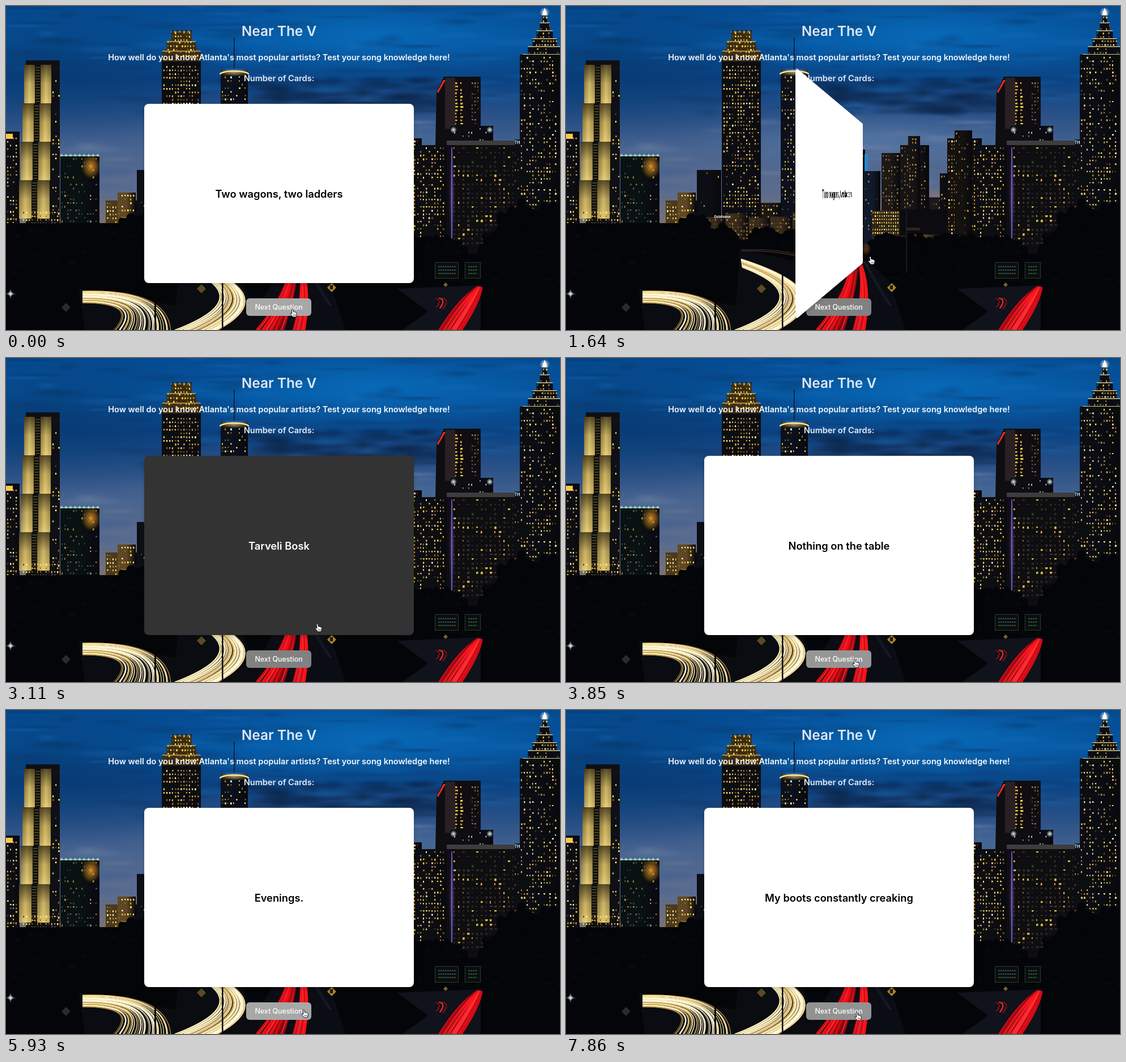
An HTML page with a canvas that plays this animation: 978x573 px, repeating every 8000 ms.

```html
<!DOCTYPE html>
<html lang="en">
<head>
<meta charset="utf-8">
<title>Song cards</title>
<style>
  html, body { margin: 0; width: 100%; height: 100%; overflow: hidden; background: #04060b; }
  #stage { position: relative; width: 978px; height: 573px; overflow: hidden; font-family: Inter, "Open Sans", sans-serif; color: #fff; }
  #stage > * { position: absolute; }
  #city { left: 0; top: 0; }
  .line { left: 0; width: 964px; text-align: center; font-weight: 600; font-size: 14.55px; line-height: 30px; white-space: nowrap; }
  #title { top: 29px; font-size: 24.4px; opacity: .86; }
  #intro { top: 76px; opacity: .96; }
  #count { top: 113px; opacity: .9; }
  #next { left: 424px; top: 517px; width: 115px; height: 31px; border-radius: 6px; font-size: 12.4px; font-weight: 500; line-height: 32px; text-align: center; }
  #scene { left: 244px; top: 173px; width: 476px; height: 317px; perspective: 800px; }
  #card { position: absolute; inset: 0; transform-style: preserve-3d; }
  .face { position: absolute; inset: 0; border-radius: 8px; display: flex; align-items: center; justify-content: center; font-size: 18.3px; font-weight: 600; backface-visibility: hidden; box-shadow: 0 3px 7px rgba(0, 0, 0, .2); }
  #front { background: #fff; color: #000; }
  #back { background: #333; transform: rotateY(180deg); }
  #hand { left: -7px; top: -8px; width: 14px; height: 16px; }
</style>
</head>
<body>
<div id="stage">
  <canvas id="city" width="978" height="573"></canvas>
  <div class="line" id="title">Near The V</div>
  <div class="line" id="intro">How well do you know Atlanta's most popular artists? Test your song knowledge here!</div>
  <div class="line" id="count">Number of Cards:</div>
  <div id="next">Next Question</div>
  <div id="scene"><div id="card">
    <div class="face" id="front"></div>
    <div class="face" id="back"></div>
  </div></div>
  <svg id="hand" viewBox="0 0 14 16">
    <path d="M3.2 2.2Q3.4.8 4.6 1Q5.6 1.1 5.8 2.3L6.3 6Q7.6 5.2 8.3 6.3Q9.6 5.7 10.3 6.9Q12 6.6 12.3 8.2L12.4 11L11 15H5.2L3.4 12.3L1 9.6Q.6 8.2 2 8.1L4 9.2Z" fill="#fff" stroke="#000" stroke-width=".9"/>
    <path d="M6.4 10.2v3M8.2 10.2v3M10 10.2v3" stroke="#222" stroke-width=".7"/>
  </svg>
</div>
<script>
const start = performance.now();
const $ = id => document.getElementById(id);
const c = $('city').getContext('2d');

let seed = 7;
function rnd(a = 0, b = 1) {
  seed = (seed + 0x6D2B79F5) | 0;
  let n = Math.imul(seed ^ seed >>> 15, 1 | seed);
  n = n + Math.imul(n ^ n >>> 7, 61 | n) ^ n;
  return a + (b - a) * ((n ^ n >>> 14) >>> 0) / 4294967296;
}
const pick = list => list[Math.floor(rnd() * list.length)];
const times = (n, draw) => { for (let i = 0; i < n; i++) draw(i); };

function rect(fill, x, y, w, h) {
  c.fillStyle = fill;
  c.fillRect(x, y, w, h);
}
function poly(fill, ...p) {
  c.fillStyle = fill;
  c.beginPath();
  for (let i = 0; i < p.length; i += 2) c.lineTo(p[i], p[i + 1]);
  c.fill();
}
function blend(g, colors) {
  colors.forEach((col, i) => g.addColorStop(i / (colors.length - 1), col));
  return g;
}
const down = (y0, y1, ...colors) => blend(c.createLinearGradient(0, y0, 0, y1), colors);
const across = (x0, x1, ...colors) => blend(c.createLinearGradient(x0, 0, x1, 0), colors);
function glow(color, x, y, rx, ry, alpha) {
  c.save();
  c.translate(x, y);
  c.scale(rx, ry);
  c.globalAlpha = alpha;
  c.fillStyle = blend(c.createRadialGradient(0, 0, 0, 0, 0, 1), [color, color + '00']);
  c.fillRect(-1, -1, 2, 2);
  c.restore();
}
function label(text, x, y, size, color) {
  c.font = `700 ${size}px Inter, sans-serif`;
  c.textAlign = 'center';
  c.fillStyle = color;
  c.fillText(text, x, y);
}

const warm = ['#ffd84a', '#e0ae36', '#a87c2c', '#fff0a0', '#6b5023'];
const brown = ['#9a773c', '#6f5732', '#c19a4c', '#4a3c2a'];

// Rows and columns of lit windows; each floor has its own share of lights.
function windows(x, y, w, h, p, colors = warm, dx = 5, dy = 6.5) {
  for (let j = y; j < y + h - 2; j += dy) {
    const share = p * rnd(.5, 1.4);
    for (let i = x; i < x + w - 2; i += dx)
      if (rnd() < share) rect(pick(colors), i, j, rnd(1.4, dx * .6), rnd(2, dy * .55));
  }
}
function tower(x, y, w, p, colors, base = '#0d0e14', bottom = 430) {
  rect(across(x, x + w, base, base, '#08090d'), x, y, w, bottom - y);
  windows(x + 2, y + 4, w - 4, bottom - y - 4, p, colors);
}
// Low blocks side by side.
function blocks(x0, x1, y, base, p, colors) {
  for (let x = x0, w; x < x1; x += w) {
    w = Math.min(rnd(26, 52), x1 - x);
    tower(x, y + rnd(-7, 7), w, p, colors, base);
  }
}

function sky() {
  rect(down(0, 390, '#054a90', '#06559f', '#0a4383', '#2b5288', '#4b6690', '#5a6a8e', '#7b7273'), 0, 0, 978, 390);
  glow('#0872c2', 640, 50, 340, 85, .7);
  glow('#07386f', 90, 110, 300, 130, .75);
  glow('#6a8cbb', 540, 235, 330, 55, .45);
  glow('#d49a63', 640, 360, 150, 45, .45);
  times(90, () => glow('#0a2347', rnd(420, 790), rnd(130, 188), rnd(18, 65), rnd(4, 12), .38));
  times(90, () => glow(pick(['#09305f', '#0a2b57', '#1c74be']), rnd(0, 978), rnd(0, 190), rnd(20, 80), rnd(3, 11), .28));
  times(60, () => glow(pick(['#7f93b5', '#33558a', '#6b7797']), rnd(90, 780), rnd(195, 330), rnd(25, 80), rnd(4, 11), .28));
}

function goldTower() {
  rect('#0f1015', 35, 96, 60, 290);
  times(4, k => {
    const x = 32 - k * 3, y = 104 + k * 68, w = 19 + k;
    for (const side of [x, x + w + 10]) {
      rect(across(side, side + w, '#a08745', '#e6cc72', '#b49a4e'), side, y, w, 68);
      rect(down(y, y + 68, '#1a1408b0', '#1a140820', '#fff0a038'), side, y, w, 68);
    }
    rect('#0f0e0c', x + w, y, 10, 68);
    times(13, j => rect('#5b5030', x + w + 1, y + 4 + j * 5, 8, 1.5));
  });
  windows(82, 112, 13, 260, .25);
  windows(30, 364, 70, 22, .8);
}

function crownTower() {
  rect('#0c0d13', 275, 92, 69, 300);
  windows(278, 106, 64, 270, .62);
  times(3, k => {
    const w = 36 + k * 16, y = 45 + k * 17;
    rect('#3b2d15', 309.5 - w / 2, y, w, 19);
    windows(311 - w / 2, y + 1, w - 2, 18, .85);
    rect('#c8a448', 309.5 - w / 2, y, w, 1.5);
  });
  times(5, k => rect('#33270f', 293 + k * 8, 42, 3, 5));
}

function roundTower() {
  rect('#181d2c', 402, 56, 1.6, 60);
  tower(379, 114, 48, .4, warm, '#0b101c');
  rect('#241b0c', 379, 114, 48, 9);
  c.strokeStyle = '#ffe49a';
  c.lineWidth = 2.5;
  c.beginPath();
  c.ellipse(403, 121, 25, 6, 0, Math.PI, 0);
  c.stroke();
  glow('#fff0b0', 403, 117, 27, 7, .6);
}

function spireTower() {
  times(6, k => {
    const w = 8 + k * k * 1.2 + k * 8, y = 15 + k * 14;
    rect('#0b0d14', 951 - w / 2, y, w, 340 - y);
    windows(952 - w / 2, y + 4, w, 11, .6);
    rect('#d9c893', 951 - w / 2, y, w, 1.5);
  });
  tower(907, 86, 71, .42, warm, '#0b0d14');
  poly('#fff3cc', 946, 16, 951, 3, 956, 16);
  glow('#ffffff', 951, 11, 9, 9, .9);
}

function slantTower() {
  poly('#0f0d12', 758, 250, 760, 153, 773, 125, 838, 125, 838, 250);
  rect('#2a2023', 775, 127, 18, 90);
  for (const x of [793, 802]) windows(x, 135, 8, 78, 1, warm.slice(0, 2), 9, 6);
  windows(822, 135, 14, 78, .6, brown);
  poly('#e32c26', 761, 152, 772, 131, 776, 131, 763, 154);
}

function frontBlock() {
  tower(784, 212, 76, .25, ['#858b92', '#d4b058']);
  rect('#0e0e10', 778, 238, 122, 200);
  windows(790, 250, 107, 175, .8, ['#2b2a28', '#383531', '#22211f', '#37342f', '#e2b548'], 8, 8);
  rect('#3d3d3d', 778, 238, 122, 8);
  rect('#6a50b4', 786, 250, 2, 170);
  glow('#7f62d8', 787, 335, 5, 90, .5);
  for (const x of [790, 854]) glow('#eaf4ff', x, 219, 6, 6, 1);
  tower(896, 246, 49, .4, brown);
  rect('#0d141c', 898, 236, 45, 10);
  label('THE VELMOR', 920.5, 244, 7, '#d8fbff');
}

function skyline() {
  tower(0, 222, 24, .5);
  rect('#f2c959', 0, 226, 12, 9);
  goldTower();
  tower(96, 265, 69, .25, ['#b58e32', '#4d5a42', '#27423c'], '#0a1113');
  glow('#ffa52a', 150, 284, 17, 22, .8);
  rect('#86d9ae', 96, 264, 69, 1.5);
  times(9, k => glow('#d8ffe9', 98 + k * 8, 264, 3, 3, .9));
  tower(176, 344, 55, .85, warm, '#4b391d');
  tower(197, 330, 32, .8, warm, '#5f4724');
  tower(231, 290, 43, .06);
  crownTower();
  blocks(344, 380, 342, '#1c1715', .35);
  roundTower();
  tower(440, 248, 60, .3, brown);
  tower(500, 254, 28, .2, brown);
  rect('#2c84c8', 527, 262, 6, 31);
  tower(526, 292, 29, .12, brown, '#111a2c');
  tower(557, 260, 33, .5, brown, '#1d1816');
  tower(590, 246, 51, .5, brown, '#171415');
  tower(604, 230, 21, .4, brown, '#171415');
  blocks(641, 673, 345, '#1b181c', .25, brown);
  tower(660, 296, 14, .15, brown);
  tower(673, 234, 61, .6, warm.slice(1), '#14110f');
  tower(686, 220, 31, .3, brown, '#14110f');
  tower(724, 246, 56, .5);
  slantTower();
  frontBlock();
  spireTower();
  blocks(246, 440, 370, '#3a2b1b', .6, brown);
  label('Ostelvane', 276, 375, 6, '#ffffff');
  rect('#2e2619', 540, 362, 49, 60);
  windows(541, 364, 48, 40, .9, warm.slice(0, 4), 4, 6);
  rect('#0c0b0f', 589, 360, 84, 45);
  label('NORVEL', 614, 397, 6, '#49413d');
  tower(606, 404, 56, .5, brown, '#5a4026');
}

function bush(x, y, w, h) {
  c.fillStyle = '#030508';
  times(60, () => {
    const a = rnd(Math.PI, 2 * Math.PI), d = rnd(.55, .95);
    c.beginPath();
    c.arc(x + Math.cos(a) * w * d, y + Math.sin(a) * h * d, rnd(2, 8), 0, 7);
    c.fill();
  });
  c.beginPath();
  c.ellipse(x, y, w * .9, h * .85, 0, 0, 7);
  c.fill();
}

function ground() {
  poly('#030508', 0, 384, 200, 384, 300, 416, 430, 405, 540, 428, 680, 415, 840, 445, 978, 360, 978, 573, 0, 573);
  bush(228, 420, 38, 56);
  bush(275, 428, 36, 40);
  bush(350, 412, 25, 18);
  bush(398, 426, 26, 26);
  times(5, k => bush(570 + k * 50, 435, 42, 30));
  bush(860, 460, 30, 60);
  times(2, k => bush(910 + k * 50, 410, 50, 66));
  times(110, () => glow(pick(['#0e171e', '#15120e']), rnd(0, 978), rnd(395, 490), rnd(3, 10), rnd(2, 5), .35));
  glow('#b86b24', 530, 430, 9, 12, .5);
  poly('#0b0d14', 495, 450, 530, 450, 570, 485, 600, 573, 420, 573);
  poly('#0a0c12', 306, 430, 400, 450, 455, 573, 140, 573, 128, 500, 300, 530);
  poly('#10121c', 690, 500, 838, 494, 838, 573, 700, 573, 745, 540);
}

// Strands spread between two curves, each given as start, bend and end.
function trails(a, b, n, colors, wide) {
  times(n, i => {
    const k = Math.min(1, Math.max(0, i / (n - 1) + rnd(-.03, .03)));
    const p = a.map((v, j) => v + (b[j] - v) * k);
    c.strokeStyle = pick(colors);
    c.lineWidth = rnd(.8, wide);
    c.beginPath();
    c.moveTo(p[0], p[1]);
    c.quadraticCurveTo(...p.slice(2));
    c.stroke();
  });
}

function sign(x, w) {
  rect('#2c3a33', x, 453, w, 29);
  rect('#080f0d', x + 1, 454, w - 2, 27);
  for (let j = 460; j < 476; j += 6)
    for (let i = x + 6; i < x + w - 7; i += 4) rect('#3f4c45', i, j, 3, 2);
}
function diamond(x, y, r, color) {
  poly(color, x, y - r, x + r, y, x, y + r, x - r, y);
}

function traffic() {
  const pale = ['#fffbe6', '#fff0b8', '#f0d283', '#c39a4b', '#fff7d2'];
  const reds = ['#fa1019', '#d60a14', '#ff2c30', '#a0080f', '#ee0f18'];
  trails([310, 431, 400, 428, 442, 452], [310, 433, 400, 432, 442, 455], 2, ['#38251e'], 2);
  trails([526, 452, 550, 500, 572, 530], [528, 452, 555, 500, 574, 530], 2, ['#2b303b'], 1);
  trails([135, 504, 285, 500, 291, 573], [135, 525, 235, 525, 190, 573], 27, pale, 2.6);
  trails([309, 448, 496, 508, 372, 573], [311, 462, 450, 515, 298, 573], 32, pale, 2.8);
  trails([500, 453, 500, 505, 441, 573], [515, 453, 514, 505, 491, 573], 26, reds, 4);
  trails([517, 453, 527, 505, 507, 573], [520, 453, 540, 500, 527, 573], 12, reds, 3.2);
  trails([832, 497, 800, 515, 764, 573], [840, 497, 836, 525, 804, 573], 22, reds, 4);
  trails([758, 517, 770, 519, 760, 533], [770, 516, 785, 520, 771, 536], 3, reds, 2);
  rect('#05060a', 262, 460, 3, 113);
  rect('#05060a', 381, 474, 2.5, 99);
  rect('#161b26', 600, 362, 2, 110);
  sign(757, 42);
  sign(810, 28);
  diamond(345, 500, 8, '#5f4a20');
  diamond(575, 498, 8, '#a98426');
  rect('#211a0c', 572, 494, 5, 7);
  diamond(776, 493, 4, '#79602a');
  diamond(106, 533, 8, '#2a2a29');
  glow('#ffffff', 8, 509, 5, 5, 1);
  for (const r of [2, 10]) glow('#cfe8ff', 8, 509, r, 12 - r, .8);
}

sky();
skyline();
ground();
traffic();

const LOOP = 8000, STEP = LOOP / 54, TURN = 300;

// One visit: click the card, click it again, go down and ask for the next question.
const visits = [
  { open: 494, shut: 1530, at: [540, 449], button: [506, 540], question: 'Two wagons, two ladders', answer: 'Zelvor' },
  { open: 2788, shut: 3430, at: [552, 477], button: [512, 540], question: 'Nothing on the table', answer: 'Tarveli Bosk' },
  { open: 4806, shut: 5391, at: [563, 483], button: [528, 537], question: 'Evenings.', answer: 'Tarveli Bosk' },
  { open: 6955, shut: 7451, at: [554, 467], button: [516, 542], question: 'My boots constantly creaking', answer: 'Zelvor' }
];
const UP = [-370, -20], DOWN = [80, 400], ASK = 650;

const clamp = v => Math.min(1, Math.max(0, v));
const ramp = (t, a, b) => clamp((t - a) / (b - a));
const smooth = v => v * v * (3 - 2 * v);

// cubic-bezier(.25, .1, .25, 1)
function ease(x) {
  let lo = 0, hi = 1, s = .5;
  times(24, () => {
    s = (lo + hi) / 2;
    if (.75 * s * (1 - s) + s ** 3 < x) lo = s; else hi = s;
  });
  return .3 * s * (1 - s) ** 2 + 3 * s * s * (1 - s) + s ** 3;
}

function draw(t) {
  let turn = 0, lit = 1, hand = [508, 543], now = visits[0];
  const move = (to, k) => { hand = hand.map((v, i) => v + (to[i] - v) * smooth(k)); };
  visits.forEach((v, i) => {
    const { open, shut, at, button } = v;
    if (i && t >= visits[i - 1].shut + ASK) now = v;
    turn += ease(ramp(t, open, open + TURN)) - ease(ramp(t, shut, shut + TURN));
    move(at, ramp(t, open + UP[0], open + UP[1]));
    move(button, ramp(t, shut + DOWN[0], shut + DOWN[1]));
    lit += ramp(t, shut + 310, shut + 510) - ramp(t, open - 250, open - 50);
  });
  $('front').textContent = now.question;
  $('back').textContent = now.answer;
  $('card').style.transform = `rotateY(${180 * turn}deg)`;
  $('hand').style.transform = `translate(${hand[0]}px, ${hand[1]}px)`;
  const grey = Math.round(129 + 38 * lit);
  $('next').style.background = `rgb(${grey}, ${grey}, ${grey})`;
}

// The picture advances in even steps.
function tick() {
  const t = (performance.now() - start) % LOOP;
  draw(Math.min(53, Math.floor((t + 8) / STEP)) * STEP);
  requestAnimationFrame(tick);
}
tick();
</script>
</body>
</html>
```
